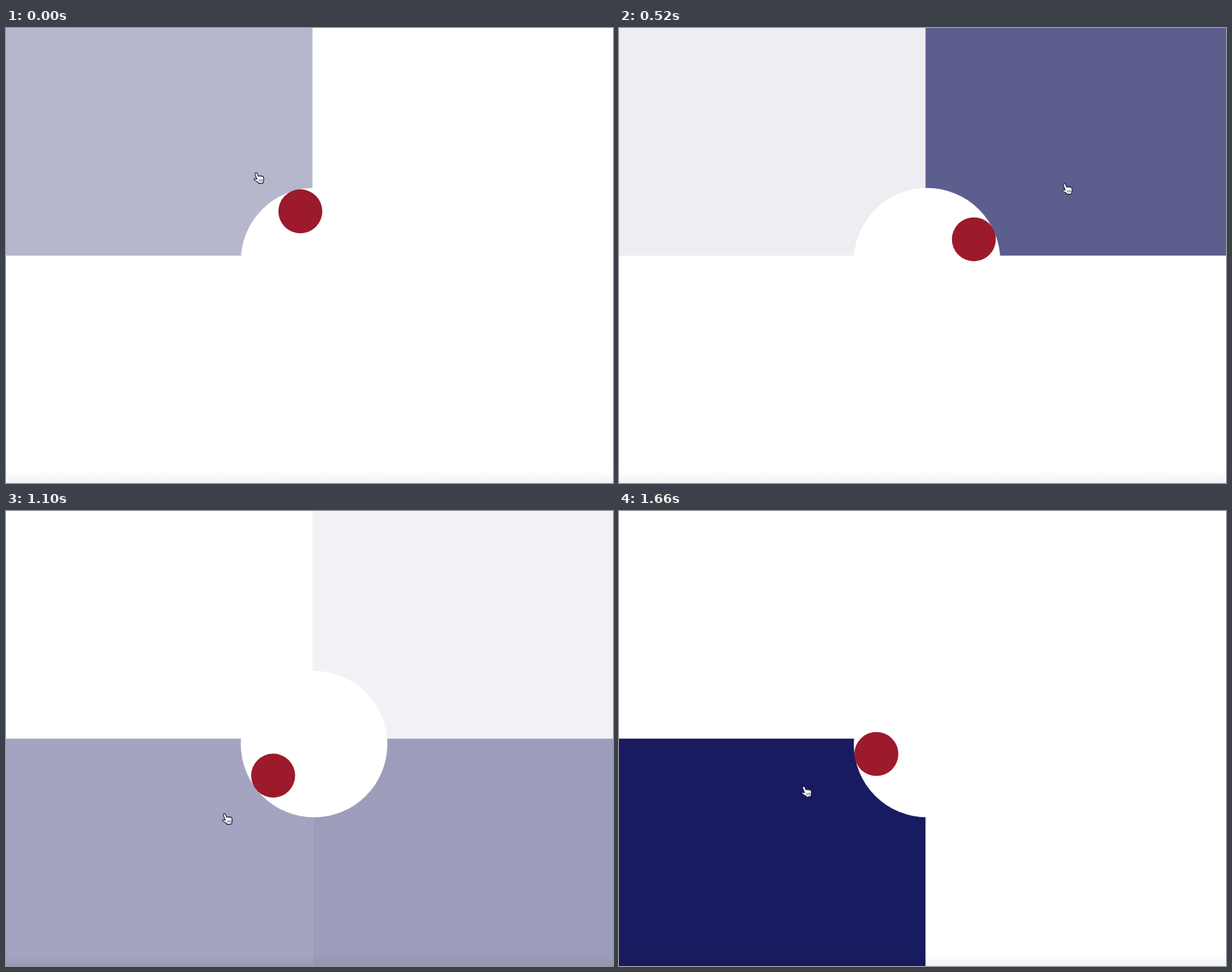
These frames come from a looping animation (864x648 px, 1.7 s). An HTML page with a canvas:

```html
<!DOCTYPE html>
<html lang="en">
<head>
<meta charset="utf-8">
<title>Quadrants</title>
<style>
  html, body { margin: 0; width: 100%; height: 100%; overflow: hidden; background: #fff; }
  canvas { display: block; }
</style>
</head>
<body>
<canvas id="stage" width="864" height="648"></canvas>
<script>
const ctx = document.getElementById('stage').getContext('2d');
const W = 864, H = 648, LOOP = 1700, STEP = 20;
const SPLIT = { x: 436.3, y: 324.2 };
const HUB = { x: 438.5, y: 332, r: 104.3 };
const BALL = { orbit: 73.5, r: 31.3 };
const NAVY = '25,27,96';

// Monotone cubic through [time, value] knots
function track(knots) {
  const n = knots.length;
  const slope = i => (knots[i + 1][1] - knots[i][1]) / (knots[i + 1][0] - knots[i][0]);
  const tangents = knots.map((k, i) => {
    if (i === 0) return slope(0);
    if (i === n - 1) return slope(n - 2);
    const a = slope(i - 1), b = slope(i);
    return a * b <= 0 ? 0 : 2 * a * b / (a + b);
  });
  return t => {
    if (t <= knots[0][0]) return knots[0][1];
    if (t >= knots[n - 1][0]) return knots[n - 1][1];
    let i = 0;
    while (t > knots[i + 1][0]) i++;
    const [t0, v0] = knots[i], [t1, v1] = knots[i + 1];
    const h = t1 - t0, u = (t - t0) / h, w = 1 - u;
    return v0 * (1 + 2 * u) * w * w + tangents[i] * h * u * w * w
         + v1 * u * u * (3 - 2 * u) - tangents[i + 1] * h * u * u * w;
  };
}

// CSS "ease": cubic-bezier(.25, .1, .25, 1)
function ease(x) {
  if (x <= 0) return 0;
  if (x >= 1) return 1;
  const bez = (s, a, b) => 3 * a * s * (1 - s) ** 2 + 3 * b * s * s * (1 - s) + s ** 3;
  let lo = 0, hi = 1;
  for (let i = 0; i < 24; i++) {
    const mid = (lo + hi) / 2;
    if (bez(mid, .25, .25) < x) lo = mid; else hi = mid;
  }
  return bez(lo, .1, 1);
}
const rise = (t, start, span) => ease((t - start) / span);

const ballAngle = track([
  [0, -105.4], [258, -89], [340, -68], [520, -25], [800, -4],
  [880, 15], [1020, 92], [1100, 142.4], [1380, 161], [1660, 169]
]);
const handX = track([
  [0, 356], [258, 437], [340, 524], [520, 634], [700, 652],
  [845, 632], [880, 597], [1020, 436], [1100, 311], [1380, 275], [1620, 263]
]);
const handY = track([
  [0, 207], [258, 138], [340, 118.5], [520, 222.5], [845, 324],
  [880, 386], [1020, 460], [1100, 432], [1380, 415], [1620, 393]
]);

const topLeftIn = track([[0, .316], [130, .57], [258, .72]]);
const quads = [
  { col: 0, row: 0, alpha: t => topLeftIn(t) * (1 - rise(t, 258, 430)) },
  { col: 1, row: 0, alpha: t => rise(t, 258, 630) * (1 - rise(t, 838, 370)) },
  { col: 1, row: 1, alpha: t => rise(Math.min(t, 1022), 852, 370) * (1 - rise(t, 1022, 297)) },
  { col: 0, row: 1, alpha: t => rise(t, 1022, 320) }
];

const handShape = new Path2D(
  'M-.9 -.6 C.1 -1.2 1.1 -.7 1.5 .2 L3.4 4.2 C3.8 3.4 5.2 3.3 5.8 4.2 ' +
  'C6.4 3.4 7.7 3.5 8.2 4.4 C9 3.9 10.1 4.2 10.4 5.2 ' +
  'C11.1 7.5 11.4 9.4 10.4 11.2 L10.2 13.6 L3.8 14.6 L3.2 13 ' +
  'C1.4 12.2 -.3 10.8 -2.2 9.6 C-3.2 8.8 -2.4 7.4 -1.2 7.6 L1.1 8.5 ' +
  'L-1.5 1.4 C-1.8 .5 -1.6 -.2 -.9 -.6 Z');
const handLines = new Path2D('M4.3 8.6 L4.9 12 M6.4 8.4 L6.9 11.8 M8.4 8.2 L8.8 11.5');

function disc(x, y, r, color) {
  ctx.fillStyle = color;
  ctx.beginPath();
  ctx.arc(x, y, r, 0, Math.PI * 2);
  ctx.fill();
}

function drawHand(x, y) {
  ctx.save();
  ctx.translate(x, y);
  ctx.lineJoin = 'round';
  ctx.fillStyle = '#fff';
  ctx.fill(handShape);
  ctx.strokeStyle = '#17173a';
  ctx.lineWidth = 1.1;
  ctx.stroke(handShape);
  ctx.lineWidth = .7;
  ctx.stroke(handLines);
  ctx.restore();
}

const shade = ctx.createLinearGradient(0, H - 18, 0, H);
shade.addColorStop(0, 'rgba(0,0,0,0)');
shade.addColorStop(1, 'rgba(0,0,0,.05)');

function draw(t) {
  ctx.fillStyle = '#fff';
  ctx.fillRect(0, 0, W, H);
  for (const { col, row, alpha } of quads) {
    ctx.fillStyle = `rgba(${NAVY},${alpha(t)})`;
    ctx.fillRect(col * SPLIT.x, row * SPLIT.y,
      col ? W - SPLIT.x : SPLIT.x, row ? H - SPLIT.y : SPLIT.y);
  }
  disc(HUB.x, HUB.y, HUB.r, '#fff');
  const a = ballAngle(t) * Math.PI / 180;
  disc(HUB.x + BALL.orbit * Math.cos(a), HUB.y + BALL.orbit * Math.sin(a), BALL.r, '#9c1a2b');
  ctx.fillStyle = shade;
  ctx.fillRect(0, H - 18, W, 18);
  drawHand(handX(t), handY(t));
}

const start = performance.now();
function tick() {
  const t = (performance.now() - start) % LOOP;
  draw(Math.min(Math.floor(t / STEP) * STEP, 1660));
  requestAnimationFrame(tick);
}
tick();
</script>
</body>
</html>
```
